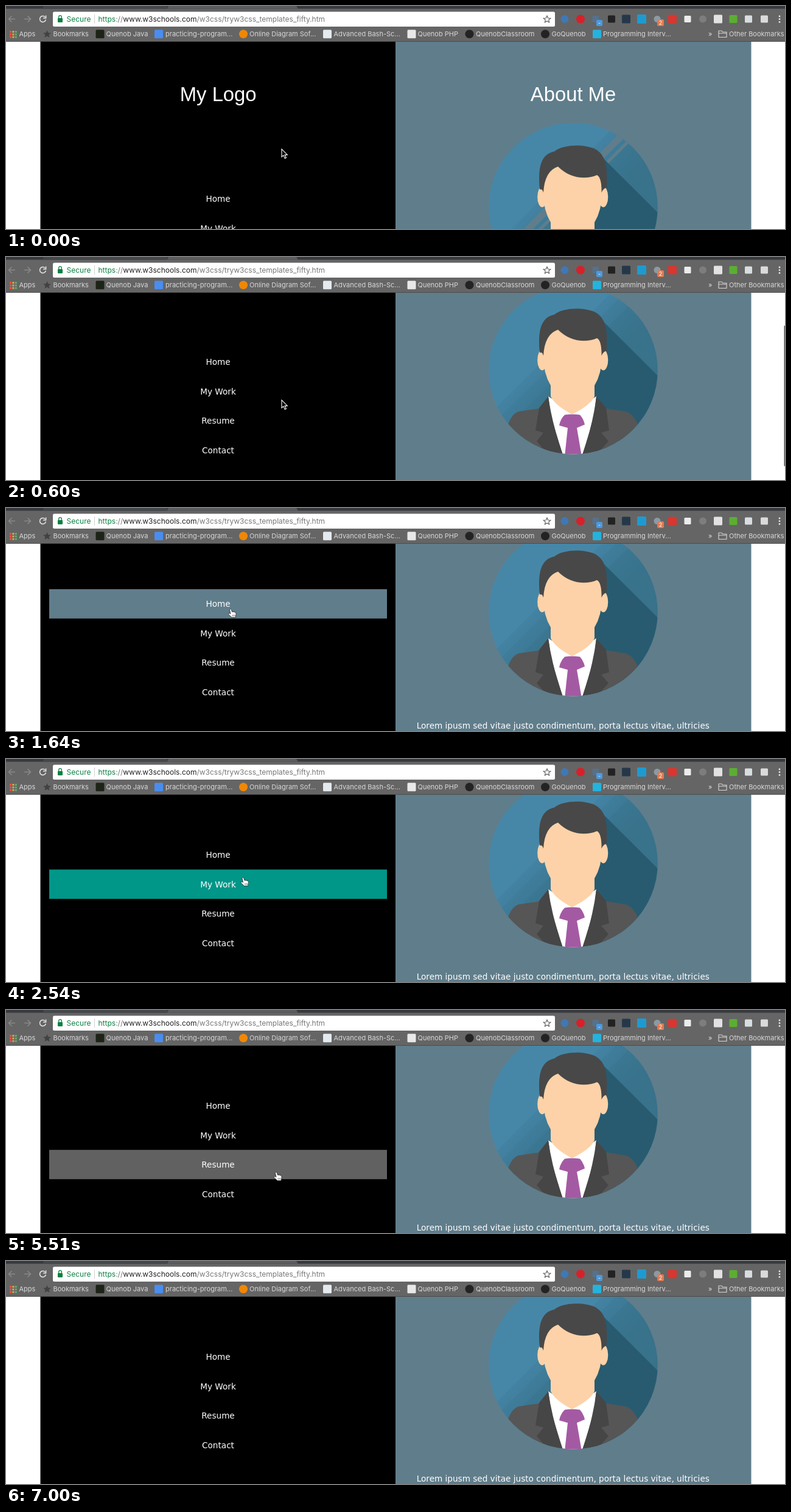
These frames come from a looping animation (1280 by 368 pixels, 8 s). An HTML page:

```html
<!DOCTYPE html>
<html lang="en">
<head>
<meta charset="utf-8">
<title>Portfolio menu</title>
<style>
html, body { margin: 0; width: 100%; height: 100%; overflow: hidden; background: #fff; }
svg { display: block; }
.ui { font-family: Inter, Roboto, sans-serif; }
.url { font-size: 12px; }
.mark { font-size: 11px; fill: #d8d8d8; }
.title { font: 32.8px "Liberation Sans", Arial, sans-serif; fill: #fff; text-anchor: middle; }
.body { font: 13.6px "DejaVu Sans", Verdana, sans-serif; fill: #fff; }
.mid { text-anchor: middle; }
</style>
</head>
<body>
<svg width="1280" height="368" viewBox="0 0 1280 368">
  <defs>
    <clipPath id="disc"><circle cx="932" cy="331.7" r="138.8"/></clipPath>
    <linearGradient id="sky" gradientUnits="userSpaceOnUse" x1="599" y1="599" x2="655" y2="655">
      <stop offset="0" stop-color="#4687a8"/>
      <stop offset="0" stop-color="#4382a2"/>
      <stop offset=".2" stop-color="#41809f"/>
      <stop offset=".2" stop-color="#3f7d9b"/>
      <stop offset=".45" stop-color="#3d7a97"/>
      <stop offset=".45" stop-color="#3b7792"/>
      <stop offset="1" stop-color="#38728b"/>
    </linearGradient>
  </defs>

  <rect width="1280" height="368" fill="#fff"/>
  <rect x="56.5" y="59" width="584" height="309"/>
  <rect x="640.5" y="59" width="584" height="309" fill="#607d8b"/>

  <g id="page">
    <text class="title" x="348.7" y="157">My Logo</text>
    <text class="title" x="932" y="157">About Me</text>
    <g id="menu"></g>

    <g clip-path="url(#disc)">
      <rect x="790" y="190" width="284" height="284" fill="url(#sky)"/>
      <g id="gaps" stroke="#607d8b">
        <path d="M1040 186 L760 466" stroke-width="11"/>
        <path d="M1060 186 L780 466" stroke-width="5"/>
      </g>
      <path d="M976 246 L1080 350 V480 H940 V300 Z" fill="#285b70"/>
      <path d="M800 480 L825 421 Q831 404 842 400 L876 395 L930 420 L987 395 L1018 400 Q1030 403 1038 421 L1060 480 Z" fill="#565656"/>
      <path d="M891 375 L930 400 L970 375 L966 410 L947 472 H915 L896 410 Z" fill="#fff"/>
      <path d="M891 375 Q897 420 916 474 L890 470 L872 449 L883 435 L870 431 L876 394 Z" fill="#464646"/>
      <path d="M970 375 Q965 420 946 474 L975 466 L990 449 L978 435 L991 431 L986 394 Z" fill="#464646"/>
      <path d="M918 405.5 Q930 403.5 943 405.5 Q949 412 951 421.5 L938 427 L946 474 H918 L923 427 L909 423 Q911 412 918 405.5 Z" fill="#a45aa3"/>
      <g fill="#fdd2a8">
        <ellipse cx="881" cy="315" rx="7.8" ry="17"/>
        <ellipse cx="981.5" cy="315" rx="7.8" ry="17"/>
        <path d="M883 310 Q883 265 905 255 H965 Q980 265 979 310 Q979 337 967 357 V375 Q960 390 930 404.5 Q902 390 895 375 V357 Q883 337 883 310 Z"/>
      </g>
      <path d="M877 303 C874 270 877 245 901 240 C914 229 948 227 968 236 C988 247 988 270 987 300 Q982 300 978.5 308 Q979 283 971 279 C950 288 925 283 907 265 Q885 272 883 308 Q881 301 877 303 Z" fill="#484848"/>
    </g>
    <text class="body" x="674.7" y="524">Lorem ipusm sed vitae justo condimentum, porta lectus vitae, ultricies</text>
  </g>

  <rect id="bar" x="1278.5" y="61" width="3" height="232" rx="1" fill="#555"/>

  <path id="arrow" d="M0 0 V13 L3 10.4 L5.2 15.4 L7.4 14.4 L5.2 9.6 H9.3 Z" fill="#000" stroke="#fff" stroke-width="1.1"/>
  <g id="hand" stroke-linejoin="round">
    <path d="M-1.6 .9 Q-1.2 -.7 .3 -.3 Q1.3 .2 1.5 1.6 L2.3 4.2 L5 4.2 L8 5.2 Q9.3 6.2 9 9 L8 13.6 H2 L-3.4 8.4 Q-4 6.2 -2 6.6 L0 7.6 Z" fill="#fff" stroke="#222" stroke-width=".8"/>
    <path d="M3.2 9 V12 M5.2 9 V12 M7 9 V12" fill="none" stroke="#333" stroke-width=".6"/>
  </g>

  <g class="ui">
    <rect width="1280" height="59" fill="#656565"/>
    <rect width="1280" height="4.5" fill="#36393e"/>
    <path d="M60 4.5 L62 0 H264 L268 4.5 Z" fill="#44474b"/>
    <path d="M265 4.5 L267 0 H477 L480 4.5 Z" fill="#5b5c5e"/>
    <rect y="58" width="1280" height="1" fill="#4d4d4d"/>

    <g fill="none" stroke-width="1.5">
      <path d="M15 21.5 H4.5 M9.5 16.5 L4.5 21.5 L9.5 26.5" stroke="#898989"/>
      <path d="M30 21.5 H40.5 M35.5 16.5 L40.5 21.5 L35.5 26.5" stroke="#898989"/>
      <path d="M64.3 18.2 A5 5 0 1 0 65.4 22.5" stroke="#e6e6e6"/>
      <path d="M65.6 15.5 V20 H61" stroke="#e6e6e6"/>
    </g>

    <rect x="77" y="9.5" width="825" height="24.5" rx="2.5" fill="#fff"/>
    <rect x="85" y="20" width="8" height="7" rx="1" fill="#0b8043"/>
    <path d="M86.7 20 V18 a2.3 2.3 0 0 1 4.6 0 V20" fill="none" stroke="#0b8043" stroke-width="1.3"/>
    <text class="url" x="99.5" y="26" fill="#0b8043">Secure</text>
    <rect x="145" y="14" width="1" height="15" fill="#d0d0d0"/>
    <text class="url" x="151.5" y="26" fill="#777"><tspan fill="#0b8043">https</tspan>://<tspan fill="#222">www.w3schools.com</tspan>/w3css/tryw3css_templates_fifty.htm</text>
    <path id="star" d="M0 -5.8 L1.7 -2 L5.8 -1.7 L2.7 1 L3.6 5 L0 2.9 L-3.6 5 L-2.7 1 L-5.8 -1.7 L-1.7 -2 Z" transform="translate(889 22)" fill="none" stroke="#555" stroke-width="1.1"/>

    <g id="tools"></g>
    <rect x="970" y="23" width="10" height="10" rx="2" fill="#4a9be0"/>
    <text x="975" y="31" font-size="9" fill="#fff" class="mid">-</text>
    <rect x="1070" y="22" width="11" height="11" rx="2" fill="#e07b52"/>
    <text x="1075.5" y="31" font-size="9" fill="#fff" class="mid">2</text>
    <g fill="#e6e6e6"><circle cx="1271" cy="17" r="1.4"/><circle cx="1271" cy="21.7" r="1.4"/><circle cx="1271" cy="26.4" r="1.4"/></g>

    <g id="apps"></g>
    <path d="M0 -6.4 L1.9 -2.2 L6.4 -1.9 L3 1.1 L4 5.6 L0 3.2 L-4 5.6 L-3 1.1 L-6.4 -1.9 L-1.9 -2.2 Z" transform="translate(67.5 46.5)" fill="#424242"/>
    <g id="marks"></g>
    <path d="M1171 42 V51.5 H1184 V43 H1177.5 L1176 41 H1171 Z M1171 45 H1184" fill="none" stroke="#d8d8d8" stroke-width="1.1"/>
  </g>
</svg>

<script>
const LOOP = 8000, ROW = 48.4, MENU_TOP = 294, END_SCROLL = 160;
const $ = id => document.getElementById(id);

function add(parent, tag, attrs, text) {
  const el = document.createElementNS("http://www.w3.org/2000/svg", tag);
  for (const k in attrs) el.setAttribute(k, attrs[k]);
  if (text) el.textContent = text;
  return parent.appendChild(el);
}

function icon(parent, x, y, size, fill, round) {
  if (round) add(parent, "circle", { cx: x, cy: y, r: size / 2, fill });
  else add(parent, "rect", { x: x - size / 2, y: y - size / 2, width: size, height: size, rx: 1.5, fill });
}

// Menu rows with their hover colours
const rows = [["Home", "#607d8b"], ["My Work", "#009688"], ["Resume", "#616161"], ["Contact", "#795548"]]
  .map(([label, fill], i) => {
    const y = MENU_TOP + i * ROW;
    const box = add($("menu"), "rect", { x: 71, y, width: 555, height: ROW, fill });
    add($("menu"), "text", { class: "body mid", x: 348.5, y: y + 29.4 }, label);
    return box;
  });

// Toolbar buttons: x, size, colour, round
[[918, 13, "#3f78b5", 1], [944, 14, "#d8202a", 1], [969, 11, "#55718c", 0], [995, 12, "#222", 0],
 [1019, 14, "#25384a", 0], [1044.5, 15, "#1d9bd1", 0], [1070, 11, "#8b9aa5", 1], [1095, 14, "#d9362f", 0],
 [1120, 11, "#ececec", 0], [1145, 12, "#7d7d7d", 1], [1170, 14, "#e2e2e2", 0], [1195, 13, "#5cae32", 0],
 [1220, 12, "#d8dde0", 0], [1246, 12, "#dadada", 0]
].forEach(([x, size, fill, round]) => icon($("tools"), x, 21.5, size, fill, round));

const appColors = ["#e2574c", "#e9a23b", "#58b368", "#4c8fe0"];
for (let i = 0; i < 9; i++)
  add($("apps"), "rect", { x: 6 + i % 3 * 4.4, y: 41 + Math.floor(i / 3) * 4.4, width: 3, height: 3, fill: appColors[(i + Math.floor(i / 3)) % 4] });

// Bookmarks: text x, label, icon x, colour, round
[[21.5, "Apps"], [77.5, "Bookmarks"],
 [164.5, "Quenob Java", 154.5, "#1d2417", 0],
 [262, "practicing-program...", 251, "#4a8df0", 0],
 [400, "Online Diagram Sof...", 390, "#f08705", 1],
 [538.5, "Advanced Bash-Sc...", 528, "#e4eaee", 0],
 [676.5, "Quenob PHP", 666.5, "#e8e8e8", 0],
 [772, "QuenobClassroom", 761.5, "#232323", 1],
 [896.5, "GoQuenob", 886, "#232323", 1],
 [981, "Programming Interv...", 971, "#25b3dd", 0],
 [1154, "»"], [1188, "Other Bookmarks"]
].forEach(([x, label, ix, fill, round]) => {
  add($("marks"), "text", { class: "mark", x, y: 50.3 }, label);
  if (ix) icon($("marks"), ix, 46.3, 14, fill, round);
});

// [time, scroll offset]
const scrolls = [[0, 0], [150, 8], [300, 48], [450, 105], [600, 145], [750, 154], [890, 158], [1040, END_SCROLL]];
// [time, scrollbar opacity]
const fades = [[0, 0], [150, 1], [1340, .6], [1490, .25], [1640, 0]];
// [time, pointer x, pointer y]
const moves = [
  [0, 453, 236], [1340, 424, 206], [1490, 388, 177], [1640, 369, 167],
  [2390, 376, 179], [2540, 389.5, 196], [2690, 394, 202], [2830, 397, 206],
  [3430, 400, 211], [3580, 406, 218], [3730, 415, 228], [3870, 426, 241], [4020, 436, 253], [4170, 441.5, 260],
  [5510, 444, 268], [5660, 450, 283], [5810, 455.5, 297], [5960, 458.5, 303.5],
  [6700, 512, 312], [6850, 902, 350], [7000, 902, 400]
];
const HOVER_FROM = 1190;
const at = (steps, t) => steps.findLast(s => s[0] <= t);

function draw(t) {
  const scroll = at(scrolls, t)[1];
  const [, x, y] = at(moves, t);
  const inMenu = t >= HOVER_FROM && x > 71 && x < 626;
  const row = inMenu ? Math.floor((y + END_SCROLL - MENU_TOP) / ROW) : -1;
  const hovering = row >= 0 && row < rows.length;

  $("page").setAttribute("transform", `translate(0 ${-scroll})`);
  $("gaps").setAttribute("visibility", scroll ? "hidden" : "visible");
  $("bar").setAttribute("y", 61 + scroll * .36);
  $("bar").setAttribute("opacity", at(fades, t)[1]);
  rows.forEach((box, i) => box.setAttribute("visibility", i === row ? "visible" : "hidden"));
  for (const [id, on] of [["arrow", !hovering], ["hand", hovering]]) {
    $(id).setAttribute("transform", `translate(${x} ${y})`);
    $(id).setAttribute("visibility", on ? "visible" : "hidden");
  }
}

const start = performance.now();
function tick() {
  draw((performance.now() - start) % LOOP);
  requestAnimationFrame(tick);
}
tick();
</script>
</body>
</html>
```
